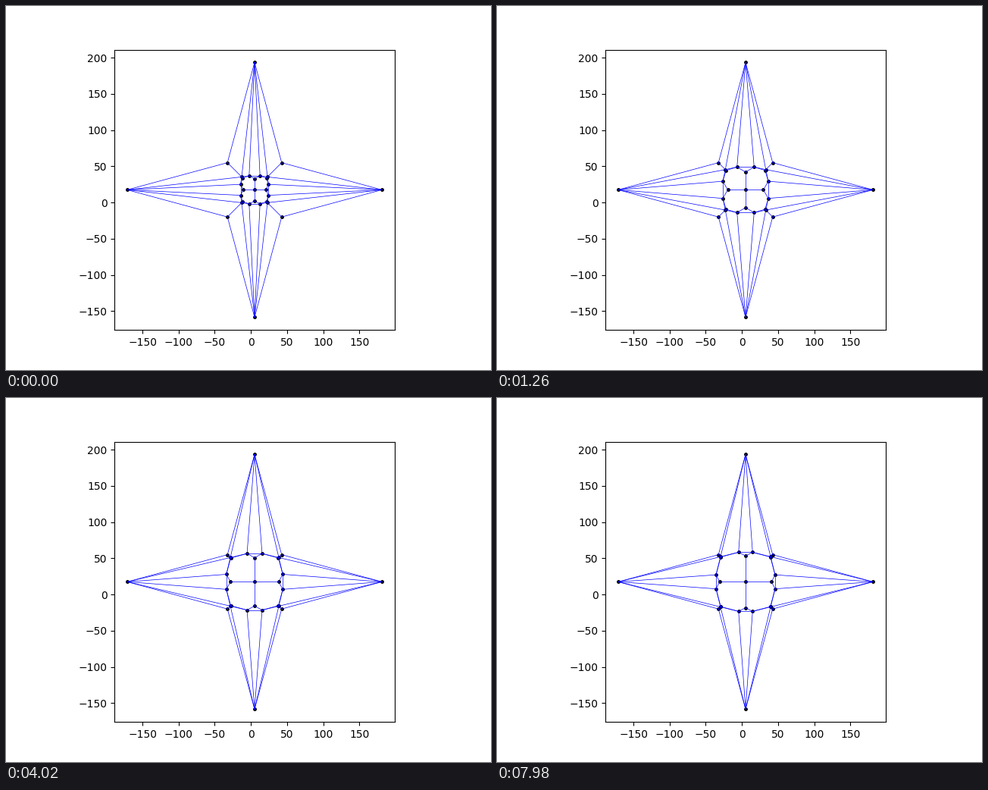
A matplotlib script that plays this animation: 640x480 px, repeating every 8 s.

```python
import numpy as np
import matplotlib.pyplot as plt
from matplotlib.animation import FuncAnimation

LOOP, STEP = 8000, 30
FRAMES = 267
CX, CY = 5.0, 17.5
TIP, CORNER, HALF = 176.0, 37.5, 193.6
UNIT = 2 * HALF / 369.6      # data units per pixel

QUARTERS = [(1, 0), (0, 1), (-1, 0), (0, -1)]


def settle(t, end, slow, tau, fast, tau_fast):
    """Relax towards end with a slow and a fast decay."""
    return end + slow * np.exp(-t / tau) + fast * np.exp(-t / tau_fast)


def layout(t):
    """Radii of the moving nodes at time t in ms."""
    hub = settle(t, 34.6, -21, 2000, 1.2, 400)
    ring = settle(t, 39.2, -17, 1850, -3.8, 650)
    side = settle(t, 9.1, 4.7, 2300, -6.6, 500)
    diag = settle(t, 33.2, -11.9, 1750, -4.3, 700)
    gap = 0.3 + 1.1 * np.exp(-t / 3000)
    return [UNIT * v for v in (hub, ring, side, diag, diag - gap)]


def rotate(p, q):
    c, s = q
    return CX + c * p[0] - s * p[1], CY + s * p[0] + c * p[1]


def build(t):
    """All nodes and edges, made from one quarter turned four times."""
    hub, ring, side, outer, inner = layout(t)
    centre, tip, mid = (0, 0), (TIP, 0), (hub, 0)
    low, high = (ring, -side), (ring, side)
    corner, d1, d2 = (CORNER, CORNER), (outer, outer), (inner, inner)
    d1_low, d2_low = (outer, -outer), (inner, -inner)
    next_low, next_tip = (side, ring), (0, TIP)

    nodes = [tip, mid, low, high, corner, d1, d2]
    edges = [
        (centre, mid), (mid, low), (mid, high), (low, high),
        (tip, low), (tip, high),
        (tip, corner), (next_tip, corner),
        (tip, d1), (next_tip, d1),
        (corner, d1), (d1, d2),
        (high, d1), (high, d2), (next_low, d1), (next_low, d2),
    ]
    points = [(CX, CY)] + [rotate(p, q) for q in QUARTERS for p in nodes]
    links = [(rotate(a, q), rotate(b, q)) for q in QUARTERS for a, b in edges]
    return np.array(points), links


fig, ax = plt.subplots(figsize=(6.4, 4.8), dpi=100)
ax.set_aspect("equal")
ax.set_xlim(CX - HALF, CX + HALF)
ax.set_ylim(CY - HALF, CY + HALF)
ax.set_xticks(range(-150, 151, 50))
ax.set_yticks(range(-150, 201, 50))

dots, = ax.plot([], [], "k.", markersize=5)
lines = [ax.plot([], [], "b-", linewidth=0.5)[0] for _ in build(0)[1]]


def update(i):
    points, links = build(i * STEP)
    dots.set_data(points[:, 0], points[:, 1])
    for line, (a, b) in zip(lines, links):
        line.set_data([a[0], b[0]], [a[1], b[1]])
    return [dots, *lines]


anim = FuncAnimation(fig, update, frames=FRAMES, interval=LOOP / FRAMES,
                     repeat=True, repeat_delay=0)
plt.show()
```
